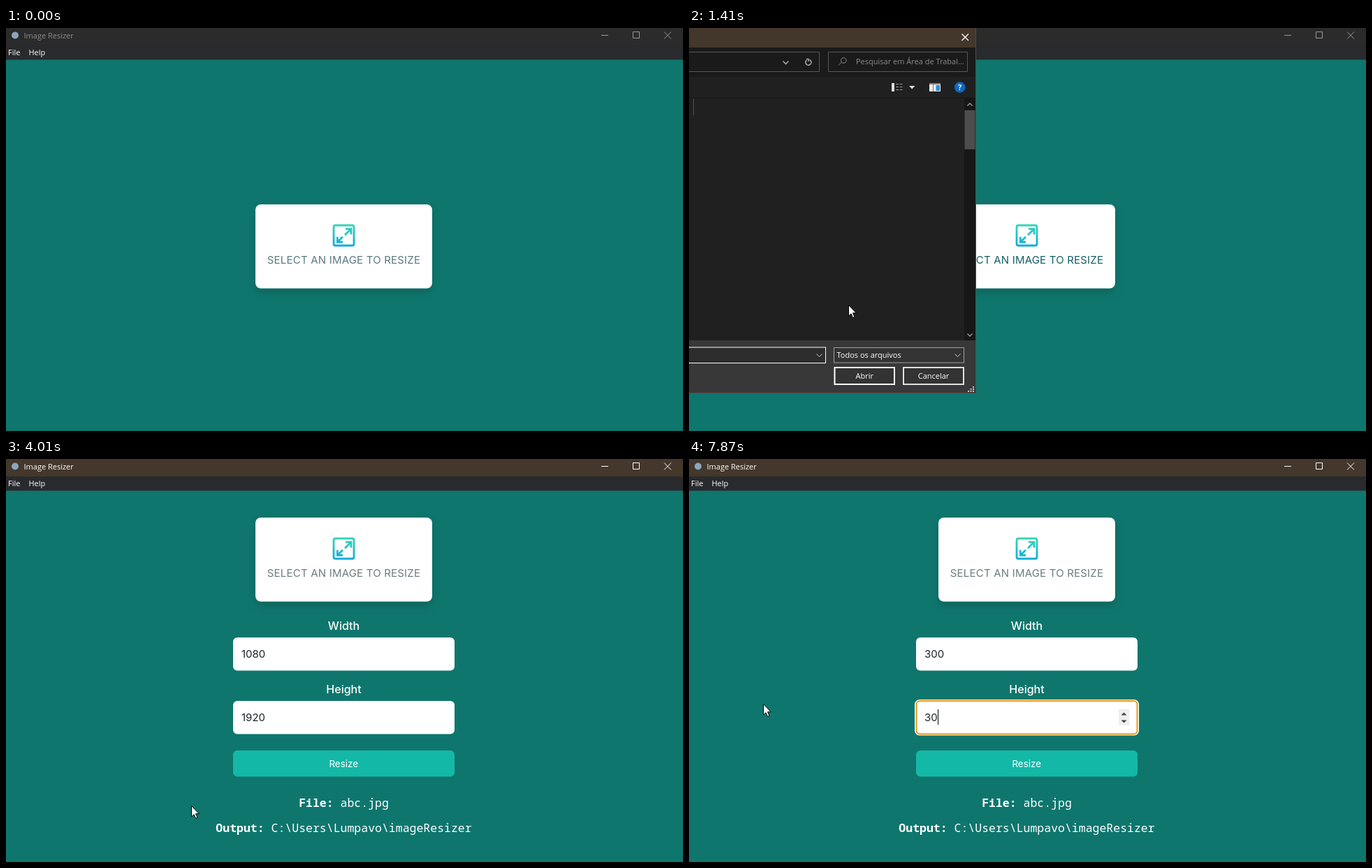
An HTML page that plays this animation: 969 px wide and 578 px high, repeating every 8 s.

```html
<!DOCTYPE html>
<html lang="en">
<head>
<meta charset="utf-8">
<title>Image Resizer</title>
<style>
  html, body { margin: 0; width: 100%; height: 100%; overflow: hidden; background: #0f766e; }
  svg { display: block; width: 969px; height: 578px; cursor: none; }
  .win { font: 11px "Open Sans", sans-serif; fill: #fff; }
  .app { font: 15px Inter, sans-serif; }
  .label { font-size: 16px; font-weight: 500; fill: #fff; }
  .mono { font: 16.5px "Noto Sans Mono", monospace; fill: #fff; white-space: pre; }
  .mono tspan { font-weight: 700; }
  .mid { text-anchor: middle; }
  .line { fill: none; stroke: #fff; }
  .card { fill: #fff; filter: drop-shadow(0 6px 6px rgb(0 0 0 / .14)); }
</style>
</head>
<body>
<svg viewBox="0 0 969 578">
  <defs>
    <linearGradient id="icon" gradientUnits="userSpaceOnUse" x1="0" y1="29" x2="0" y2="60">
      <stop stop-color="#34d6b6"/><stop offset="1" stop-color="#12abdc"/>
    </linearGradient>
  </defs>

  <rect width="969" height="578" fill="#0f766e"/>
  <rect id="titleBar" width="969" height="25"/>
  <rect y="25" width="969" height="20.5" fill="#292a2d"/>
  <circle cx="13" cy="10.5" r="5" fill="#8aa7bd"/>
  <g class="win">
    <text id="title" x="25.5" y="15">Image Resizer</text>
    <text x="3" y="39">File</text>
    <text x="32.5" y="39">Help</text>
  </g>
  <path id="controls" class="line" d="M852 10.5H862M897.5 5.5H906.5V14.5H897.5ZM942 5.5 952 15.5M952 5.5 942 15.5"/>

  <g id="card">
    <rect class="card" width="253" height="120.5" rx="8"/>
    <g fill="none" stroke="url(#icon)" stroke-width="2.8">
      <rect x="112" y="30" width="29" height="29" rx="2.5"/>
      <path d="M128 44 137 35M129 35.2H137V43M125 46.5 117.3 54M117.3 46.5V54H125"/>
    </g>
    <text id="prompt" class="app mid" x="126.5" y="85" letter-spacing=".2">SELECT AN IMAGE TO RESIZE</text>
  </g>

  <g id="form">
    <text class="app label mid" x="483.5" y="245">Width</text>
    <g id="width" transform="translate(325 256)"></g>
    <text class="app label mid" x="483.5" y="336">Height</text>
    <g id="height" transform="translate(325 347)"></g>
    <rect x="325" y="418" width="317" height="37.5" rx="6" fill="#14b8a6"/>
    <text class="app mid" x="483.2" y="441.5" fill="#fff" style="font-size:13.4px">Resize</text>
    <text class="mono mid" x="483.5" y="499"><tspan>File:</tspan> abc.jpg</text>
    <text class="mono mid" x="483.5" y="535"><tspan>Output:</tspan> C:\Users\Lumpavo\imageResizer</text>
  </g>

  <g id="dialog" class="win">
    <rect width="411" height="524" fill="#383838"/>
    <rect width="411" height="28" fill="#43372b"/>
    <rect y="28" width="411" height="420" fill="#202020"/>
    <rect y="28" width="411" height="42" fill="#1a1a1a"/>
    <path class="line" d="M390.5 8.5 400 18M400 8.5 390.5 18" stroke-width="1.3"/>
    <path class="line" style="stroke:#575757" d="M0 34.5H186.5V62.5H0M199.5 34.5H398.5V62.5H199.5Z"/>
    <path class="line" style="stroke:#a5a5a5" stroke-width="1.6" d="M134.5 47.5 138.5 51.5 142.5 47.5M168.5 46A4 4 0 1 0 172.5 45.5M168 44.5H171V48"/>
    <path class="line" style="stroke:#8a8a8a" d="M214 53.5 218.5 49A3.8 3.8 0 1 1 221 50.3Q219.5 50.2 218.5 49"/>
    <text x="239" y="52" fill="#8c8c8c">Pesquisar em Área de Trabal...</text>
    <path d="M290 79H294V91H290Z" fill="#ddd"/>
    <path class="line" style="stroke:#999" stroke-dasharray="4 1.5" d="M296 80.5H306M296 84.5H306M296 88.5H306"/>
    <path d="M315 83H323.5L319.2 87.5Z" fill="#ddd"/>
    <path d="M344 79.5H360V91H344Z" fill="#eee"/>
    <path d="M353.5 82H359V90H353.5Z" fill="#2b8fdb"/>
    <path class="line" style="stroke:#777" d="M344 80.5H360M349.5 81V91"/>
    <circle cx="387.7" cy="85" r="7.8" fill="#0f66c0"/>
    <text class="mid" x="387.7" y="89" font-weight="700">?</text>
    <path d="M0 100H411V101H0Z" fill="#151515"/>
    <path class="line" style="stroke:#5d4b42" d="M6.5 101V125"/>
    <rect x="394" y="101" width="16" height="347" fill="#171717"/>
    <rect x="394.5" y="118" width="15" height="56" fill="#4d4d4d"/>
    <path class="line" style="stroke:#999" stroke-width="1.4" d="M398.5 111.5 402 108 405.5 111.5M398.5 438.5 402 442 405.5 438.5"/>
    <rect id="fileName" x="-5" y="458" width="200.5" height="22.5" fill="#2d2d2d"/>
    <rect x="207.5" y="458.5" width="186" height="21.5" fill="#333" stroke="#a0a0a0"/>
    <path class="line" style="stroke:#ccc" d="M182.5 467.5 186.5 471.5 190.5 467.5M380.5 467.5 384.5 471.5 388.5 467.5"/>
    <text x="211.5" y="473">Todos os arquivos</text>
    <rect id="open" x="208.5" y="487" width="85.5" height="24" stroke-width="2"/>
    <rect x="307" y="487" width="86" height="24" fill="#333" stroke="#e0e0e0" stroke-width="2"/>
    <text class="mid" x="251.3" y="503">Abrir</text>
    <text class="mid" x="350" y="503">Cancelar</text>
    <path class="line" style="stroke:#ccc" stroke-width="2" stroke-dasharray="2 1.5" d="M406 515H408M402.5 518H408M399 521H408"/>
    <path class="line" style="stroke:#544a42" d="M410.5 0V523.5H0"/>
    <g id="popup">
      <rect id="popupBox" x="-5" y="477.5" width="180.5" fill="#2b2b2b" stroke="#777"/>
      <rect id="popupRow" y="478.5" width="175" height="18.5" fill="#4d4d4d"/>
    </g>
  </g>

  <path id="arrow" fill="#fff" stroke="#000" d="M.5 .5V16L4 12.8 6.6 18.5 9 17.4 6.5 11.8H11.3Z"/>
  <path id="beam" fill="none" stroke="#000" d="M-3 -8.5H-1L0 -7.5 1 -8.5H3M0 -7.5V7.5M-3 8.5H-1L0 7.5 1 8.5H3"/>
</svg>

<script>
const LOOP = 8000;
const HOVER = 780, DIALOG = 1010, CLOSE = 3630, FORM = 3680;
const PRESS_WIDTH = 4480, PRESS_HEIGHT = 6860;

// Pointer path: time, x, y
const path = [
  [160, 985, 590], [230, 960, 570], [430, 715, 492], [600, 585, 412],
  [760, 514, 366], [890, 503, 344], [1010, 503, 344], [1410, 228, 397],
  [1810, 228, 397], [2000, 110, 482], [2800, 110, 482], [3000, 255, 498],
  [3150, 255, 498], [3280, 249, 498], [3940, 249, 498], [4010, 265, 498],
  [4400, 385, 284], [4480, 385, 284], [4780, 212, 258], [4850, 191, 268],
  [5250, 191, 268], [5320, 193, 267], [6260, 193, 267], [6720, 388, 372],
  [6860, 388, 372], [7130, 92, 354], [7210, 105, 351], [7600, 106, 351]
];

const $ = id => document.getElementById(id);
const set = (id, attrs) => { for (const k in attrs) $(id).setAttribute(k, attrs[k]); };
const show = (id, on) => set(id, { display: on ? 'inline' : 'none' });
const ramp = (t, from, length) => Math.min(1, Math.max(0, (t - from) / length));
const mix = (a, b, p) => `rgb(${a.map((v, i) => Math.round(v + (b[i] - v) * p))})`;

const ruler = document.createElement('canvas').getContext('2d');
const measure = text => {
  ruler.font = '15px Inter, sans-serif';
  return ruler.measureText(text).width;
};

function pointer(t) {
  const i = path.findIndex(p => p[0] > t);
  if (i === 0) return path[0].slice(1);
  if (i < 0) return path[path.length - 1].slice(1);
  const [t0, x0, y0] = path[i - 1], [t1, x1, y1] = path[i];
  const p = (t - t0) / (t1 - t0);
  return [x0 + (x1 - x0) * p, y0 + (y1 - y0) * p];
}

// Value of a field, and the time of its last key
function typed(t, initial, keys) {
  const n = keys.filter(k => t >= k).length;
  return n ? { text: '300'.slice(0, n), key: keys[n - 1] } : { text: initial, key: 0 };
}

function drawField(id, t, { text, key }, focus, hover, x) {
  let kept = text.length;
  if (focus && !key) {
    kept = 0;
    while (kept < text.length && measure(text.slice(0, kept)) + 4 < x - 337) kept++;
  }
  const head = text.slice(0, kept), tail = text.slice(kept);
  const start = 12 + measure(head);
  let out = focus
    ? `<rect x="-2" y="-2" width="321" height="51.5" rx="7" fill="#fff"/>
       <rect x=".5" y="0" width="316" height="47.5" rx="5" fill="#fff" stroke="#e59a12" stroke-width="2"/>`
    : '<rect width="317" height="47.5" rx="6" fill="#fff"/>';
  if (tail) out += `<rect x="${start}" y="11" width="${measure(tail)}" height="24.5" fill="#3390ff"/>`;
  out += `<text class="app" x="12" y="29" fill="#1b2426">${head}<tspan fill="#fff">${tail}</tspan></text>`;
  if (focus && key && (t - key) % 1000 < 500)
    out += `<rect x="${Math.round(start)}" y="12" width="1" height="22" fill="#000"/>`;
  if (focus || hover)
    out += `<rect x="290" y="11.5" width="15" height="23.5" fill="#efefef"/>
            <path d="M293.5 20.5H301.5L297.5 16.5ZM293.5 27.5H301.5L297.5 31.5Z" fill="#444"/>`;
  if ($(id).last !== out) $(id).innerHTML = $(id).last = out;
}

function draw(t) {
  const [x, y] = pointer(t);
  const active = t >= FORM;

  set('titleBar', { fill: active ? '#44372b' : '#2b2b2b' });
  set('title', { fill: active ? '#fff' : '#8c8c8c' });
  $('controls').style.stroke = active ? '#fff' : '#999';
  set('card', { transform: `translate(357 ${active ? 84 : 253})` });
  set('prompt', { fill: active ? '#6b7c7e' : mix([90, 122, 128], [20, 94, 102], ramp(t, HOVER, 110)) });

  show('dialog', t >= DIALOG && t < CLOSE);
  set('fileName', { stroke: t < 3350 ? '#fff' : '#999' });
  const lit = ramp(t, 3150, 250);
  set('open', { fill: mix([51, 51, 51], [104, 104, 104], lit), stroke: mix([255, 255, 255], [205, 205, 205], lit) });
  show('popup', t >= 1670 && t < 2800);
  set('popupBox', { height: t < 1810 ? 100 : 19.5 });
  show('popupRow', t >= 2280);

  show('form', active);
  const inside = top => active && x > 325 && x < 642 && y > top && y < top + 47;
  const overWidth = inside(256), overHeight = inside(347);
  drawField('width', t, typed(t, '1080', [5660, 5790, 5920]), t >= PRESS_WIDTH && t < PRESS_HEIGHT, overWidth, x);
  drawField('height', t, typed(t, '1920', [7600, 7870]), t >= PRESS_HEIGHT, overHeight, x);

  const beam = overWidth || overHeight;
  show('arrow', !beam);
  show('beam', beam);
  set(beam ? 'beam' : 'arrow', { transform: `translate(${Math.round(x)} ${Math.round(y)})` });
}

function frame() {
  draw(performance.now() % LOOP);
  requestAnimationFrame(frame);
}
frame();
</script>
</body>
</html>
```
